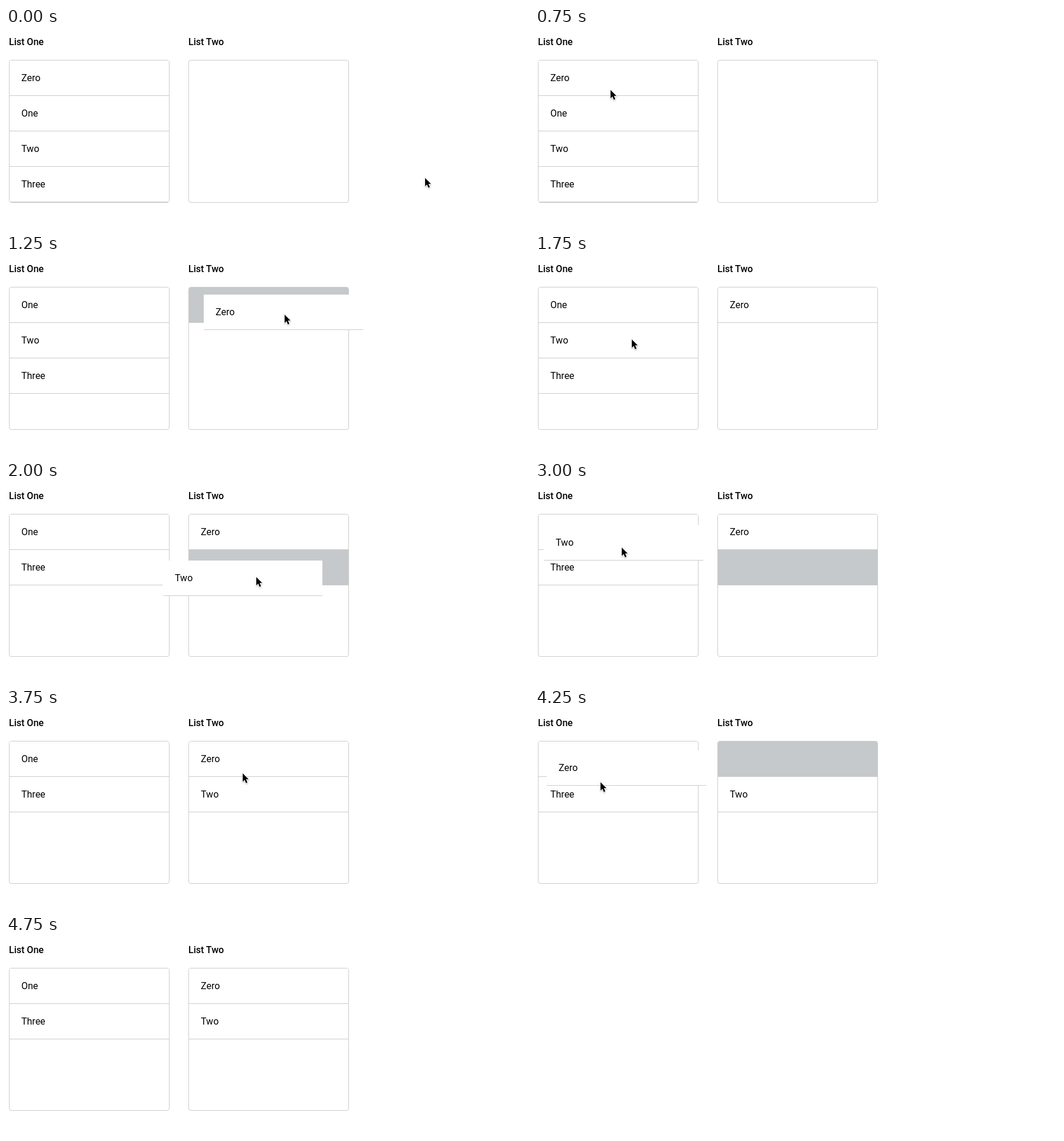
Recreate the animation shown at these times as an HTML page. Size 886 by 337 pixels, loop 5500 ms.

```html
<!DOCTYPE html>
<html lang="en">
<head>
<meta charset="utf-8">
<title>Drag between lists</title>
<style>
  html, body { margin: 0; width: 100%; height: 100%; overflow: hidden; background: #fff; }
  body { position: relative; font: 16px Roboto, sans-serif; color: #000; }
  h2 { position: absolute; top: 13px; margin: 0; font-size: 16px; font-weight: 500; line-height: 21px; }
  .list {
    position: absolute; top: 54px; box-sizing: border-box; width: 272px; height: 242px;
    border: 1px solid #ccc; border-radius: 4px; overflow: hidden;
  }
  .item {
    box-sizing: border-box; width: 270px; height: 60px; padding-left: 20px;
    line-height: 59px; border-bottom: 1px solid #ccc; background: #fff;
  }
  .gap { background: #c5c9cb; }
  #drag, #cursor { position: absolute; left: 0; top: 0; }
  #cursor { overflow: visible; filter: drop-shadow(0 1px 1px rgba(0, 0, 0, .3)); }
  .first { left: 5px; }
  .second { left: 309px; }
</style>
</head>
<body>
<h2 class="first">List One</h2>
<h2 class="second">List Two</h2>
<div class="list first"></div>
<div class="list second"></div>
<div id="drag" class="item"></div>
<svg id="cursor" width="12" height="19">
  <path d="M0 0V14L3.2 11L5.6 16.6L8 15.6L5.7 10.1H10Z" stroke="#fff" stroke-width="1.6" paint-order="stroke"/>
</svg>
<script>
const LOOP = 5500, STEP = 250;
const GAP = '_';

// Text of both lists in each arrangement, GAP marks the drop placeholder.
const layouts = {
  start: ['Zero One Two Three', ''],
  liftZero: ['_ One Two Three', ''],
  overTwo: ['One Two Three', '_'],
  zeroMoved: ['One Two Three', 'Zero'],
  addTwo: ['One Three', 'Zero _'],
  sorted: ['One Three', 'Zero Two'],
  liftBack: ['One Three', '_ Two'],
};

// What is held and where the pointer grips it.
const zero = ['Zero', 137, 34], two = ['Two', 158, 28];
const twoAgain = ['Two', 132, 38], zeroAgain = ['Zero', 91, 54];

// One entry per step: layout, pointer position, held item.
const steps = [
  ['start', [710, 254]],
  ['start'],
  ['start', [147, 282]],
  ['start', [128, 105]],
  ['liftZero', [191, 96], zero],
  ['overTwo', [472, 101], zero],
  ['zeroMoved', [431, 108]],
  ['zeroMoved', [164, 143]],
  ['addTwo', [424, 161], two],
  ['addTwo', [441, 148], two],
  ['sorted', [442, 154]],
  ['addTwo', [200, 116], twoAgain],
  ['addTwo', [147, 111], twoAgain],
  ['sorted', [380, 130]],
  ['sorted', [392, 144]],
  ['sorted', [401, 109]],
  ['liftBack', [151, 129], zeroAgain],
  ['liftBack', [111, 124], zeroAgain],
  ['sorted'],
  ['sorted'],
];

const lists = document.querySelectorAll('.list');
const drag = document.getElementById('drag');
const cursor = document.getElementById('cursor');

function fill(list, words) {
  list.replaceChildren(...words.split(' ').filter(Boolean).map(word => {
    const item = document.createElement('div');
    item.className = word === GAP ? 'item gap' : 'item';
    item.textContent = word === GAP ? '' : word;
    return item;
  }));
}

function place(el, x, y) {
  el.style.transform = `translate(${x}px, ${y}px)`;
}

function show([layout, pointer, held]) {
  layouts[layout].forEach((words, i) => fill(lists[i], words));
  cursor.style.display = pointer ? '' : 'none';
  drag.style.display = held ? '' : 'none';
  if (pointer) place(cursor, ...pointer);
  if (held) {
    const [word, gripX, gripY] = held;
    drag.textContent = word;
    place(drag, pointer[0] - gripX, pointer[1] - gripY);
  }
}

const begin = performance.now();
let current = -1;

function tick() {
  const time = (performance.now() - begin) % LOOP;
  const index = Math.min(Math.floor(time / STEP), steps.length - 1);
  if (index !== current) show(steps[current = index]);
  requestAnimationFrame(tick);
}
tick();
</script>
</body>
</html>
```
